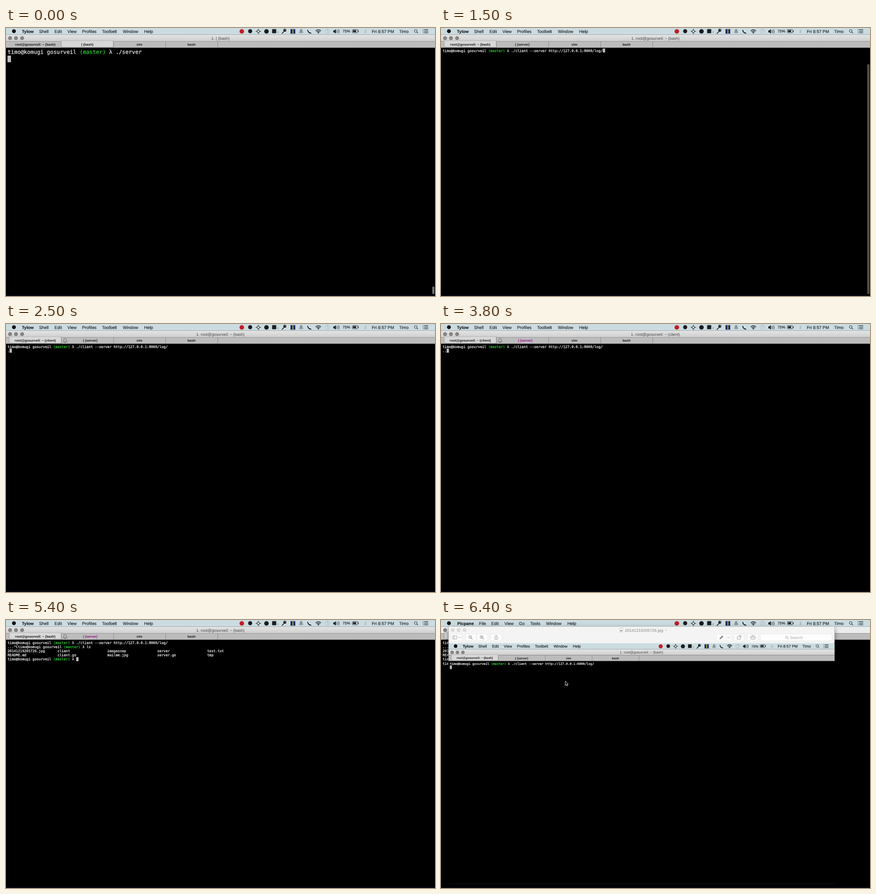
Recreate the animation shown at these times as an HTML page. Size 947 px wide and 592 px high, loop 8000 ms.

```html
<!DOCTYPE html>
<html lang="en">
<head>
<meta charset="utf-8">
<title>Terminal session</title>
<style>
html, body { margin: 0; width: 100%; height: 100%; overflow: hidden; background: #000; }
svg { display: block; width: 100vw; height: 100vh; }
text { white-space: pre; text-rendering: geometricPrecision; font-family: "Liberation Sans", Arial, sans-serif; }
.menu { font-size: 9.5px; fill: #111; stroke: #111; stroke-width: .12; }
.title { font-size: 8.8px; fill: #444; text-anchor: middle; }
.tab { font-size: 7.5px; font-weight: bold; text-anchor: middle; }
.term { font-family: "DejaVu Sans Mono", "Liberation Mono", monospace; fill: #e2e2e2; stroke: #e2e2e2; stroke-width: .32; }
.term tspan { fill: #25cc34; stroke: #25cc34; }
</style>
</head>
<body>
<svg id="stage" viewBox="0 0 947 592" xmlns="http://www.w3.org/2000/svg">
  <defs>
    <linearGradient id="head" x1="0" y1="0" x2="0" y2="1">
      <stop offset="0" stop-color="#e4e4e4"/><stop offset="1" stop-color="#cfcfcf"/>
    </linearGradient>
    <filter id="shadow" x="-5%" y="-5%" width="110%" height="112%">
      <feDropShadow dx="0" dy="4" stdDeviation="6" flood-opacity=".5"/>
    </filter>
  </defs>
  <g id="scene"></g>
</svg>
<script>
const LOOP = 8000;
const PROMPT = 'timo@komugi gosurveil (master) λ ';
const CLIENT = PROMPT + './client --server http://127.0.0.1:8000/log/';
const PURPLE = '#96108c', RED = '#f01818', DARK = '#1a1a1a';
const IMAGE = '20141219205726.jpg';

const termMenu = [['Tylow', 35], ['Shell', 73], ['Edit', 107], ['View', 135.5], ['Profiles', 168],
  ['Toolbelt', 212], ['Window', 258], ['Help', 305]];
const viewMenu = [['Picpane', 36], ['File', 84], ['Edit', 111], ['View', 140], ['Go', 172],
  ['Tools', 197], ['Window', 232], ['Help', 279]];

const rootTab = job => `root@gosurveil: ~ (${job})`;
const columns = names => names.map(n => n.padEnd(24)).join('').trimEnd();
const listing = [
  CLIENT,
  '...^C' + PROMPT + 'ls',
  columns([IMAGE, 'client', 'imagesnap', 'server', 'test.txt']),
  columns(['README.md', 'client.go', 'mailme.jpg', 'server.go', 'tmp'])
];
const opened = [...listing, PROMPT + 'open ' + IMAGE];

// Each step keeps whatever it does not change.
const start = {
  active: 1, title: '1. ( (bash)', first: 'bash', second: 'bash', tint: DARK, bell: false,
  big: true, lines: [PROMPT + './server', ''], bar: [571, 17, .9], menu: termMenu, viewer: false
};
const steps = [
  [0, {}],
  [500, { second: 'server', title: '1. ( (server)', bar: null }],
  [1500, { active: 0, title: '1. ' + rootTab('bash'), big: false, lines: [CLIENT], bar: [80, 508, .65] }],
  [2000, { bar: [80, 508, .3] }],
  [2500, { first: 'client', bell: true, lines: [CLIENT, '.'], bar: null }],
  [3000, { tint: RED }],
  [3400, { tint: PURPLE, title: '1. ' + rootTab('client') }],
  [3800, { lines: [CLIENT, '..'] }],
  [4800, { lines: [CLIENT, '...'] }],
  [5000, { first: 'bash', lines: [CLIENT, '...^C' + PROMPT] }],
  [5200, { title: '1. ' + rootTab('bash'), lines: listing.slice(0, 2) }],
  [5400, { lines: [...listing, PROMPT] }],
  [5600, { lines: [...listing, PROMPT + 'open '] }],
  [5800, { lines: opened }],
  [6000, { tint: RED, lines: [...opened, ''] }],
  [6200, { lines: [...opened, PROMPT] }],
  [6400, { menu: viewMenu, viewer: true }]
];
const states = [];
steps.reduce((prev, [at, change]) => {
  const next = { ...prev, ...change };
  states.push({ at, ...next });
  return next;
}, start);

const shot = { ...start, active: 0, title: '1. ' + rootTab('bash'), second: 'server',
  big: false, lines: [CLIENT, ''], bar: null };

const rect = (x, y, w, h, fill, more = '') =>
  `<rect x="${x}" y="${y}" width="${w}" height="${h}" fill="${fill}" ${more}/>`;
const dot = (x, y, r, fill, more = '') => `<circle cx="${x}" cy="${y}" r="${r}" fill="${fill}" ${more}/>`;
const line = (d, stroke, width = 1, fill = 'none') =>
  `<path d="${d}" stroke="${stroke}" stroke-width="${width}" fill="${fill}" stroke-linecap="round"/>`;
const label = (kind, x, y, str, more = '') => `<text class="${kind}" x="${x}" y="${y}" ${more}>${str}</text>`;

const bell = (x, y, stroke, fill = 'none') =>
  line(`M${x - 4.5} ${y + 3}q2-1.5 2-4.5q0-3 2.5-3t2.5 3q0 3 2 4.5z`, stroke, .8, fill) +
  line(`M${x - 1} ${y + 4.5}h2`, stroke, 1);

const lens = (x, y, r, stroke) =>
  dot(x, y, r, 'none', `stroke="${stroke}"`) + line(`M${x + r * .7} ${y + r * .7}l${r * .8} ${r * .8}`, stroke, 1.1);

function statusIcons() {
  const ink = '#1c1c1c', faint = '#a9b5b9';
  return dot(520.5, 7.5, 5, '#c31d22') +
    dot(539, 7, 4.5, ink) +
    dot(557, 7.5, 3, 'none', `stroke="${ink}"`) + line('M557 2v3M557 10v3M551.5 7.5h3M559.5 7.5h3', ink) +
    dot(575, 7.5, 5, ink) +
    rect(587.5, 2.5, 9, 9, ink) + line('M600.5 8v2', ink, .8) +
    line('M615.5 5.5L609.5 12', ink, 1.8) + dot(615.5, 5, 3.2, ink) + dot(616.5, 4.3, .9, '#cbdce1') +
    rect(628, 2.5, 10.5, 10, '#18265f') + rect(632.5, 3, 1.7, 9, '#e1d04a') +
    bell(651.5, 7, '#8a9599', '#8a9599') +
    line('M666 5q1 6 7 6.5M666 5l1 2M673 11.5l-2-1', ink, 1.8) +
    line('M684 6q5.5-5 11 0M686 8q3.5-3 7 0M688 10q1.5-1.3 3 0', ink, 1.5) + dot(689.5, 11.4, .9, ink) +
    dot(709.5, 7, 4.6, 'none', `stroke="${faint}"`) + line('M709.5 4v3h2.5', faint) +
    line('M723 5.5h2l3-2.5v9l-3-2.5h-2z', ink, .5, ink) +
    line('M730 5q1.5 2.5 0 5M732.2 4q2.4 3.5 0 7M734.4 3q3 4.5 0 9', ink, .8) +
    label('menu', 743, 10.3, '75%', 'style="font-size:8.5px"') +
    rect(764.5, 3.5, 12, 7, 'none', `rx="1" stroke="${ink}" stroke-width=".9"`) +
    rect(766, 5, 7, 4, ink) + rect(777.3, 5.5, 1.2, 3, ink) +
    rect(791.5, 4, 4, 7, '#b3c0c4') +
    label('menu', 807.5, 10.5, 'Fri 8:57 PM') + label('menu', 868, 10.5, 'Timo') +
    lens(904.5, 6.5, 3.1, ink) +
    [3.5, 7, 10.5].map(y => rect(920, y - .6, 1.5, 1.2, ink) + rect(923, y - .6, 9, 1.2, ink)).join('');
}

function menuBar(items) {
  return rect(0, 0, 947, 14.5, '#cbdce1') +
    dot(17.5, 7, 4.3, '#111') +
    items.map(([name, x], i) => label('menu', x, 10.5, name, i ? '' : 'font-weight="bold"')).join('') +
    statusIcons();
}

function tabBar(s) {
  const left = i => 7 + 115 * i;
  const names = [rootTab(s.first), `( (${s.second})`, 'vim', 'bash'];
  const x = left(s.active);
  let out = rect(0, 29, 947, 15, '#bcbcbc') + rect(0, 29, 947, .8, '#8e8e8e') + rect(0, 43, 947, .8, '#777');
  out += [1, 2, 3, 4].map(i => rect(left(i), 29.5, .9, 14, '#858585')).join('');
  out += line(`M${x} 28.5v11q0 3 3 3h109q3 0 3-3v-11z`, '#8b8b8b', .8, '#d8d8d8') +
    rect(x + .4, 28, 114.2, 1.6, '#d2d2d2');
  if (s.bell) out += bell(130.5, 36, '#555');
  return out + names.map((name, i) => {
    const shift = i === 1 && s.bell ? 6.5 : 0;
    const y = i === s.active ? 38.6 : 39.2;
    return label('tab', left(i) + 57.5 + shift, y, name, `fill="${i === 1 ? s.tint : DARK}"`);
  }).join('');
}

function terminal(s) {
  const [size, step, top, rise] = s.big ? [12, 15, 46, 11] : [7.636, 9.22, 45.3, 7.2];
  const cell = size * .602;
  const last = s.lines.length - 1;
  const column = s.lines[last].length;
  const rows = s.lines.map((str, i) => label('term', 3.5, top + rise + i * step,
    str.replace('(master)', '<tspan>(master)</tspan>'), `font-size="${size}"`)).join('');
  return rect(0, 43.8, 947, 548.2, '#000') + rect(0, 589.5, 947, 2.5, '#080812') + rows +
    rect(3.3 + column * cell, top + last * step, cell + .4, step - .4, '#bdbdbd') +
    (s.bar ? rect(941, s.bar[0], 4.6, s.bar[1], '#808080', `rx="2.3" opacity="${s.bar[2]}"`) : '');
}

function desktop(s) {
  return rect(0, 14.5, 947, 14.5, s.viewer ? '#ececec' : 'url(#head)') +
    [9, 22, 35.5].map(x => dot(x, 22.3, 3.9, '#858585', 'stroke="#6c6c6c" stroke-width=".6"')).join('') +
    label('title', 473.3, 25.6, s.title) + tabBar(s) + terminal(s) + menuBar(s.menu);
}

function viewer() {
  const grey = '#8c8c8c';
  const button = (x, w) => rect(x, 31, w, 15, '#fdfdfd', 'rx="2" stroke="#e2e2e2" stroke-width=".7"');
  const head = rect(16.5, 15, 852.3, 569, '#000', 'rx="3" filter="url(#shadow)"') +
    rect(16.5, 14.5, 852.3, 37.5, '#f4f4f4', 'rx="3"') +
    [26, 39, 52].map(x => dot(x, 22.3, 3.9, '#dcdcdc', 'stroke="#cfcfcf" stroke-width=".5"')).join('') +
    rect(394.5, 18, 6.5, 8.5, '#fff', 'stroke="#aaa" stroke-width=".7"') + rect(396, 22, 3.5, 3, '#999') +
    label('title', 448.3, 25.6, IMAGE, 'style="font-size:9px;fill:#858585"') +
    line('M494.5 21.3l2 2l2-2', '#aaa', .9);
  const buttons = [[23, 23], [54, 24], [79, 24], [110, 24], [608, 22], [630, 11], [647, 22], [677, 23], [705, 158]]
    .map(([x, w]) => button(x, w)).join('');
  const icons = rect(26, 35, 9, 7, 'none', `stroke="${grey}" stroke-width=".8"`) + line('M29 35v7', grey, .8) +
    line('M39 37.5l2 2l2-2M633 37.5l2 2l2-2', grey, .9) +
    lens(64.5, 37.5, 3.2, grey) + line('M63 37.5h3', grey, .8) +
    lens(89.5, 37.5, 3.2, grey) + line('M88 37.5h3M89.5 36v3', grey, .8) +
    line('M120 37h-1.5v5.5h6.5v-5.5h-1.5M121.8 40v-6.5M120 35l1.8-1.8l1.8 1.8', grey, .8) +
    line('M615 42l1-2.5l5-5l2 2l-5 5z', grey, .6, grey) +
    rect(654, 37, 7, 5.5, 'none', `stroke="${grey}" stroke-width=".8"`) +
    line('M658 34.5h4.5v3M659.5 33l-1.5 1.5l1.5 1.5', grey, .8) +
    rect(683.5, 36, 10, 6.5, 'none', `rx="1" stroke="${grey}" stroke-width=".8"`) +
    line('M686.5 36v-2h4v2M683.5 39h10', grey, .8) +
    lens(763, 38, 2.4, '#aaa') + label('title', 784.5, 41.6, 'Search', 'style="font-size:9px;fill:#aaa"');
  const picture = `<g transform="translate(16.5 51.4) scale(.9)">${desktop(shot)}</g>`;
  const pointer = line('M274.3 135.3v9l2-1.9l1.5 3.4l1.5-.7l-1.5-3.2h2.7z', '#f2f2f2', .9, '#000');
  return head + buttons + icons + picture + pointer;
}

const scene = document.getElementById('scene');
let shown = null;

function draw(t) {
  const state = states.findLast(s => s.at <= t);
  if (state === shown) return;
  shown = state;
  scene.innerHTML = desktop(state) + (state.viewer ? viewer() : '');
}

function tick() {
  draw(performance.now() % LOOP);
  requestAnimationFrame(tick);
}
tick();
</script>
</body>
</html>
```
